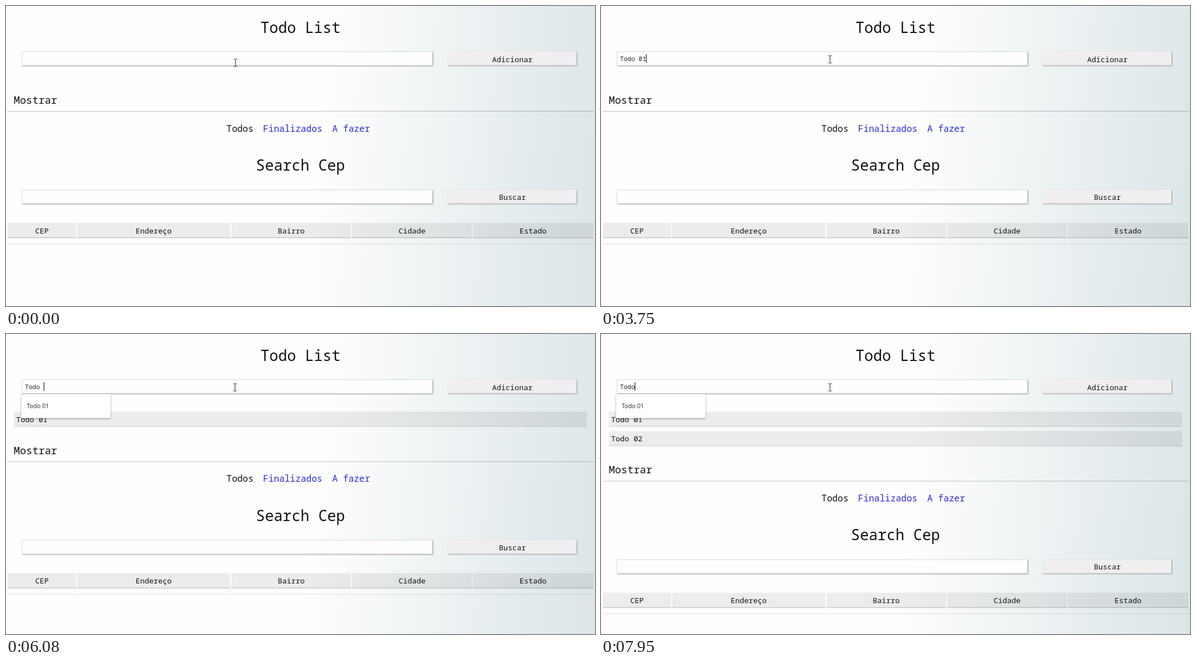
These frames come from a looping animation (1048 by 534 pixels, 8000 ms). An HTML page:

```html
<!DOCTYPE html>
<html lang="pt">
<head>
<meta charset="utf-8">
<title>Todo List</title>
<style>
  html, body { margin: 0; width: 100%; height: 100%; overflow: hidden; }
  body { background: linear-gradient(95deg, #fefefe 52%, #dbe5e8 100%); }
  svg { display: block; width: 1048px; height: 534px; }
  text { font: 300 13.3px "Roboto Mono", "Noto Sans Mono", "Liberation Mono", monospace; fill: #111; white-space: pre; }
  .mid { text-anchor: middle; }
  text.title { font-size: 26.4px; }
  text.sub { font-size: 18.4px; }
  text.filter { font-size: 16px; }
  text.typed { font-size: 11.08px; fill: #222; }
  text.hint { font: 400 10.6px "Open Sans", "Noto Sans", sans-serif; fill: #222; }
  text.link { fill: #2a2add; }
  .field { fill: #fefefe; stroke: #dedede; }
  .button { fill: #f0eef0; }
  .bar { fill: #000; fill-opacity: .07; }
  .edge { fill: #000; fill-opacity: .24; }
  .faint { fill: #000; fill-opacity: .13; }
  .raised { filter: drop-shadow(1px 1px 1px rgba(0, 0, 0, .36)); }
  #popup rect { fill: #fff; filter: drop-shadow(0 1px 1.5px rgba(0, 0, 0, .4)); }
  #pointer path { fill: none; stroke: #222; }
</style>
</head>
<body>
<svg viewBox="0 0 1048 534">
  <text class="mid title" x="524" y="48">Todo List</text>
  <g class="raised"><rect class="field" x="28.5" y="81.5" width="730" height="24"/></g>
  <g class="raised"><rect class="button" x="785" y="81" width="230" height="24.5"/></g>
  <text class="mid" x="901" y="99.5">Adicionar</text>
  <g id="items"></g>

  <g id="lower">
    <text class="sub" x="13.8" y="174">Mostrar</text>
    <rect class="edge" x="2" y="187" width="1044" height="1"/>
    <text class="filter" x="392.3" y="223.5">Todos</text>
    <text class="filter link" x="457.3" y="223.5">Finalizados</text>
    <text class="filter link" x="580.6" y="223.5">A fazer</text>
    <text class="mid title" x="524" y="293">Search Cep</text>
    <g class="raised"><rect class="field" x="28.5" y="327.5" width="730" height="24"/></g>
    <g class="raised"><rect class="button" x="785" y="327" width="230" height="24.5"/></g>
    <text class="mid" x="901" y="345">Buscar</text>
    <g id="table"></g>
  </g>

  <text id="typed" class="typed" x="33.8" y="97.6"></text>
  <rect id="caret" y="86" width="1" height="15" fill="#000"/>
  <g id="popup"></g>
  <g id="pointer">
    <path d="M-3 -6.5H-1Q0 -6.5 0 -5.5V5.5Q0 6.5 -1 6.5H-3M3 -6.5H1Q0 -6.5 0 -5.5M0 5.5Q0 6.5 1 6.5H3"/>
  </g>
</svg>
<script>
  const LOOP = 8000;
  const OLD = ["123", "23232", "12", "122"];
  const NEW = ["Todo 01"];
  const $ = id => document.getElementById(id);

  // Each step changes only the listed properties at its time.
  const steps = [
    [0, { text: "", caret: 0, hints: OLD, fade: 0, count: 0, px: 408.5, py: 101 }],
    [70, { px: 407.5, py: 95 }],
    [490, { caret: 1, fade: .5 }],
    [570, { fade: 1 }],
    [1040, { caret: 0 }],
    [1580, { caret: 1 }],
    [1970, { text: "T", fade: .4 }],
    [2130, { fade: 0 }],
    [2440, { text: "To" }],
    [2590, { text: "Tod" }],
    [2750, { text: "Todo" }],
    [3210, { text: "Todo " }],
    [3750, { text: "Todo 01" }],
    [4140, { text: "", count: 1, hints: NEW }],
    [4600, { caret: 0 }],
    [4760, { text: "T", caret: 1 }],
    [5300, { caret: 0 }],
    [5380, { text: "To", caret: 1, fade: 1 }],
    [5610, { text: "Tod" }],
    [5770, { text: "Todo" }],
    [6080, { text: "Todo " }],
    [6310, { text: "Todo 0" }],
    [6470, { text: "Todo 02" }],
    [6550, { fade: .4 }],
    [6630, { fade: 0 }],
    [6780, { text: "", count: 2 }],
    [7320, { text: "T", fade: 1 }],
    [7710, { text: "To" }],
    [7790, { text: "Tod" }],
    [7950, { text: "Todo" }]
  ];

  const rect = (cls, x, y, w, h) =>
    `<rect class="${cls}" x="${x}" y="${y}" width="${w}" height="${h}"/>`;
  const label = (cls, x, y, s) => `<text class="${cls}" x="${x}" y="${y}">${s}</text>`;

  const columns = [["CEP", 3, 125], ["Endereço", 126.5, 399], ["Bairro", 401, 614],
                   ["Cidade", 616, 829], ["Estado", 830.5, 1045]];
  $("table").innerHTML = columns.map(([name, a, b]) =>
    rect("bar", a, 386, b - a, 27) + rect("edge", a, 412, b - a, 1) +
    rect("faint", a, 423, b - a, 1) + label("mid", (a + b) / 2, 404.5, name)).join("");

  const itemRow = i => {
    const y = 138 + i * 34.7;
    return rect("bar", 14, y, 1020, 27) + rect("faint", 14, y + 26, 1020, 1) +
      label("", 18, y + 18.5, "Todo 0" + (i + 1));
  };

  const popup = hints =>
    `<rect x="27" y="107" width="159" height="${13 + 29.8 * hints.length}" rx="2"/>` +
    hints.map((s, i) => label("hint", 37, 132.2 + i * 29.8, s)).join("");

  let shown = -1;
  function draw(now) {
    const t = now % LOOP;
    const n = steps.filter(([at]) => at <= t).length;
    if (n !== shown) {
      shown = n;
      const s = Object.assign({}, ...steps.slice(0, n).map(step => step[1]));
      $("typed").textContent = s.text;
      $("caret").setAttribute("x", Math.round(33.8 + s.text.length * 6.65));
      $("caret").setAttribute("opacity", s.caret);
      $("popup").innerHTML = popup(s.hints);
      $("popup").setAttribute("opacity", s.fade);
      $("items").innerHTML = Array.from({ length: s.count }, (_, i) => itemRow(i)).join("");
      $("lower").setAttribute("transform", `translate(0 ${s.count ? 5 + 34.7 * s.count : 0})`);
      $("pointer").setAttribute("transform", `translate(${s.px} ${s.py})`);
    }
    requestAnimationFrame(() => draw(performance.now() - start));
  }
  const start = performance.now();
  draw(0);
</script>
</body>
</html>
```
